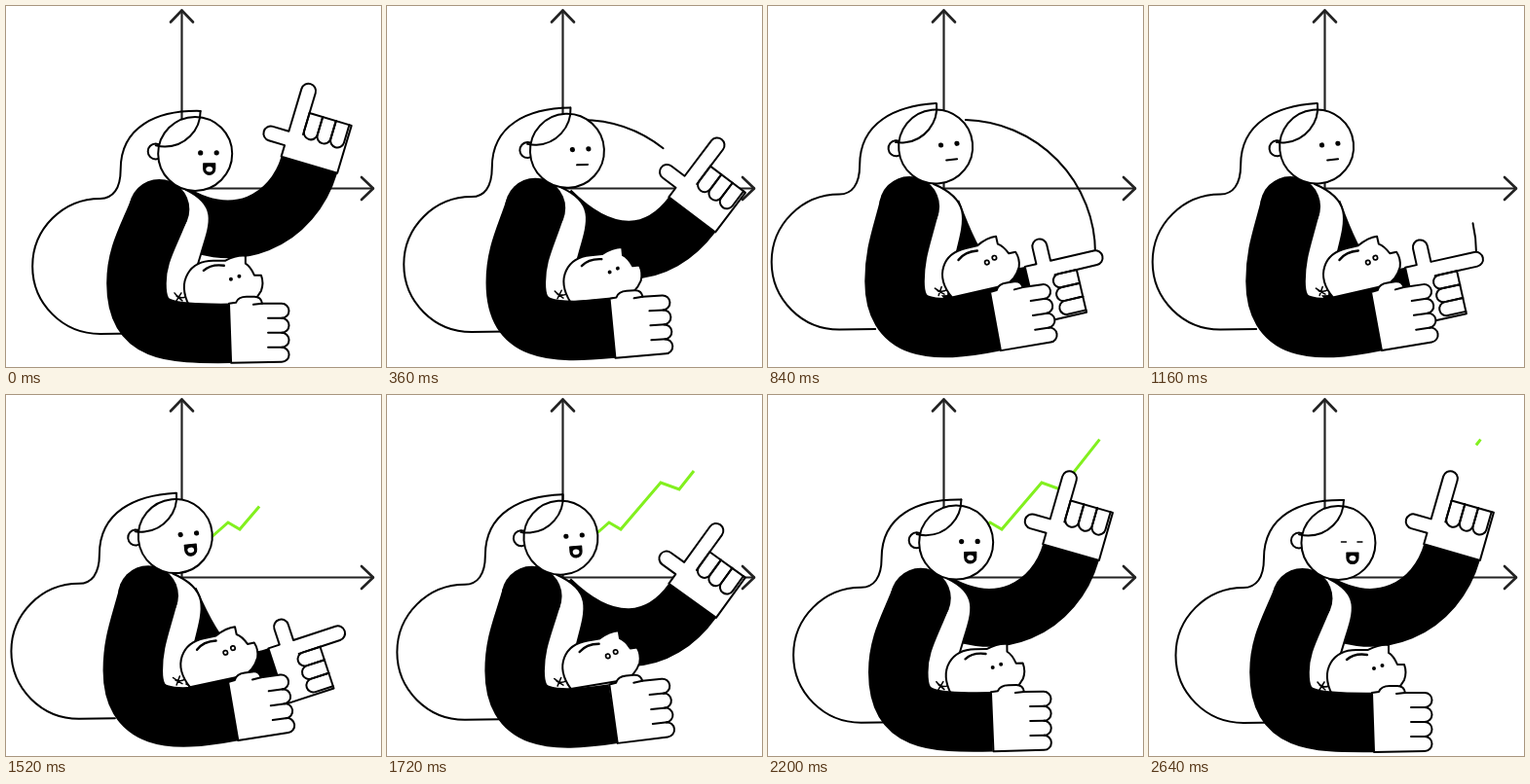
An HTML page with a canvas for the animation above (2.68 s loop, 385x371 px).

```html
<!DOCTYPE html>
<html lang="en">
<head>
<meta charset="utf-8">
<title>Rising chart</title>
<style>
  html, body { margin: 0; width: 100%; height: 100%; overflow: hidden; background: #fff; }
  canvas { display: block; }
</style>
</head>
<body>
<canvas id="stage" width="385" height="371"></canvas>
<script>
const ctx = document.getElementById('stage').getContext('2d');
const LOOP = 2680, INK = '#000', PAPER = '#fff', LIME = '#82f01e', AXIS = '#222';
const RAD = Math.PI / 180, QUARTER = Math.PI / 2;

const clamp = v => Math.min(1, Math.max(0, v));
const mix = (a, b, f) => a.map((v, i) => v + (b[i] - v) * f);
const polar = (x, y, r, degrees) => [x + r * Math.cos(degrees * RAD), y + r * Math.sin(degrees * RAD)];
const sine = (t, from, to) => (1 - Math.cos(Math.PI * clamp((t - from) / (to - from)))) / 2;
const sigmoid = (t, middle, spread) => 1 / (1 + Math.exp((middle - t) / spread));

function paint(fill, stroke, width = 2, path) {
  const target = path ? [path] : [];
  if (fill) { ctx.fillStyle = fill; ctx.fill(...target); }
  if (stroke) { ctx.strokeStyle = stroke; ctx.lineWidth = width; ctx.stroke(...target); }
}

function shape(build, fill, stroke = INK, width) {
  ctx.beginPath();
  build();
  paint(fill, stroke, width);
}

const outline = (d, fill, width, stroke = INK) => paint(fill, stroke, width, new Path2D(d));
const line = (points, color = INK, width = 2) =>
  shape(() => points.forEach(p => ctx.lineTo(...p)), null, color, width);
const dot = (x, y, r) => shape(() => ctx.arc(x, y, r, 0, 7), INK, null);
const ring = (x, y, r, width) => shape(() => ctx.arc(x, y, r, 0, 7), PAPER, INK, width);

function placed([x, y], degrees, draw) {
  ctx.save();
  ctx.translate(x, y);
  ctx.rotate(degrees * RAD);
  draw();
  ctx.restore();
}

// A sleeve is one thick stroke with a flat cuff.
function sleeve(width, start, ...controls) {
  ctx.save();
  ctx.lineCap = 'butt';
  shape(() => {
    ctx.moveTo(...start);
    for (let i = 0; i < controls.length; i += 3) ctx.bezierCurveTo(...controls.slice(i, i + 3).flat());
  }, null, INK, width);
  ctx.restore();
}

function arrow(x, y, degrees, length) {
  placed([x, y], degrees, () => {
    line([[-length, 0], [0, 0]], AXIS, 2.2);
    line([[-12, -11.5], [0, 0], [-12, 11.5]], AXIS, 2.6);
  });
}

function sweep(t) {
  const head = sine(t, 0, 800), tail = sine(t, 800, 1280);
  if (head > tail) shape(() => ctx.arc(199, 254, 137, (tail - 1) * QUARTER, (head - 1) * QUARTER));
}

function chart(t) {
  const length = 220;
  const u = clamp((t - 2000) / 720);
  const head = sine(t, 1120, 1960), tail = u * u * (3 - 2 * u);
  if (head <= tail) return;
  ctx.save();
  ctx.lineCap = 'butt';
  ctx.lineJoin = 'miter';
  ctx.setLineDash([(head - tail) * length, length * 2]);
  ctx.lineDashOffset = -tail * length;
  outline('M185 169L228 131L240 138L281 90L300 97L341 45', null, 3, LIME);
  ctx.restore();
}

function hair(lean) {
  const dx = -24 * lean, dy = -4.5 * lean;
  shape(() => {
    ctx.moveTo(200 - 28 * lean, 108 - 8 * lean);
    ctx.bezierCurveTo(155 + dx, 107 + dy, 118 + dx, 124 + dy, 118 + dx, 168 + dy);
    ctx.bezierCurveTo(118 + dx, 188 + dy, 110 + dx, 198 + dy, 97 + dx, 198 + dy);
    ctx.arc(97 + dx, 267.5 + dy, 69.5, -QUARTER, QUARTER, true);
    ctx.lineTo(134 + dx, 336.5 + dy);
  });
}

// Origin at the middle of the cuff.
function pointingHand() {
  const finger = 14.2, r = 7.5;
  shape(() => {
    ctx.moveTo(30, 0);
    ctx.lineTo(30, -51);
    ctx.lineTo(-15, -51);
    ctx.arc(-22.5, -72.5, r, 0, Math.PI, true);
    ctx.lineTo(-30, -27);
    ctx.arc(-47, -19.5, r, -QUARTER, QUARTER, true);
    ctx.lineTo(-30, -12);
    ctx.lineTo(-30, 0);
    ctx.closePath();
  }, PAPER);
  line([[-15, -51], [-15, -28]]);
  for (let x = -15; x < 25; x += finger) {
    shape(() => {
      ctx.moveTo(x, -51);
      ctx.arc(x + finger / 2, -32, finger / 2, Math.PI, 0, true);
      ctx.lineTo(x + finger, -51);
    });
  }
}

// One angle moves the whole far arm around the shoulder.
function farArm(turn) {
  const shoulder = [168, 210], tilt = 16 + turn;
  const wrist = polar(...shoulder, 151 - .27 * turn, .97 * turn - 18.7);
  sleeve(60, shoulder,
    polar(...shoulder, 80, 32 + .62 * turn),
    polar(...wrist, 58, tilt + 90),
    wrist);
  placed(wrist, tilt, pointingHand);
}

function torso(lean) {
  const edge = () => {
    ctx.moveTo(...mix([185, 189], [170, 183], lean));
    ctx.bezierCurveTo(...mix([232, 212, 196, 240, 190, 300], [222, 205, 192, 235, 185, 297], lean));
  };
  shape(() => {
    edge();
    ctx.lineTo(160, 298);
    ctx.lineTo(158, 182);
  }, PAPER, null);
  shape(edge);
}

function nearArm(lean) {
  const at = (x, y, dx, dy) => [x + dx * lean, y + dy * lean];
  const shoulder = at(157.5, 209, -12.5, -3);
  dot(...shoulder, 31);
  sleeve(61.5, shoulder,
    at(146, 238, -9, 0), at(134, 256, -4, -2), at(134, 285, -4, -2),
    at(134, 335, -4, -3), at(165, 337, 0, 1), at(230, 336.5, 3, -12.5));
}

function face(smile, blink) {
  ring(-40.5, -2.5, 8);
  ring(0, 0, 38);
  shape(() => {
    ctx.moveTo(5.5, -44);
    ctx.arc(-31, -44, 36.5, 0, 105 * RAD);
  });
  for (const x of [5.5, 22]) {
    if (blink) line([[x - 2.5, -1], [x + 2.5, -1]], INK, 1.4);
    else dot(x, -1, 2.6);
  }
  if (!smile) return line([[9.5, 15], [20.5, 15]]);
  outline('M8.5 10H20.5V15.5A6 6 0 0 1 8.5 15.5Z', INK, 1.2);
  shape(() => ctx.ellipse(14.5, 15.8, 3.4, 2.8, 0, 0, 7), PAPER, null);
}

// Origin at the middle of the pig's rear.
function pig(ringEyes) {
  outline('M2 9Q-5 12 -10 5M-3 5L-8 13M-8 8L-2 13', null, 1.5);
  outline('M5 18C-8 -8 6 -28 30 -28L42 -28Q54 -34 63 -33L63 -25Q68 -22 72 -13L79 -13Q82 -5 79 3Q72 16 60 18Z', PAPER);
  outline('M20 -18Q28 -25 41 -23', null, 2.4);
  for (const [x, y] of [[48, -9], [56.5, -12]]) {
    if (ringEyes) ring(x, y, 2.2, 1.7);
    else dot(x, y, 2);
  }
}

// Origin at the upper end of the cuff.
function holdingHand() {
  const finger = 15;
  shape(() => {
    ctx.moveTo(0, 0);
    ctx.lineTo(7, -1);
    ctx.bezierCurveTo(9, -6, 13, -7, 18, -7);
    ctx.lineTo(26, -7);
    ctx.quadraticCurveTo(33, -7, 34, 0);
    for (let i = 0; i < 4; i++) ctx.arc(54, (i + .5) * finger, finger / 2, -QUARTER, QUARTER);
    ctx.lineTo(2, 61);
    ctx.closePath();
  }, PAPER);
  line([[34, 0], [25, 1]]);
  for (let i = 1; i < 4; i++) line([[40, i * finger], [55, i * finger]]);
}

function render(t) {
  const lean = sigmoid(t, 388, 90) - sigmoid(t, 1840, 130);
  const turn = 61.5 * (sigmoid(t, 421, 92) - sigmoid(t, 1672, 66));
  const leaning = (from, to, degrees, draw) => placed(mix(from, to, lean), degrees * lean, draw);

  ctx.fillStyle = PAPER;
  ctx.fillRect(0, 0, 385, 371);
  ctx.lineCap = ctx.lineJoin = 'round';
  arrow(180.5, 4.5, -90, 183);
  arrow(377, 187.5, 0, 196);
  sweep(t);
  chart(t);
  hair(lean);
  farArm(turn);
  torso(lean);
  leaning([183, 290], [180, 283], -13, () => pig(lean > .6));
  nearArm(lean);
  leaning([194.5, 152], [172, 144.5], -6, () => face(t < 120 || t >= 1320, t >= 2560));
  leaning([229, 306], [228, 294], -8.5, holdingHand);
}

function tick() {
  render(performance.now() % LOOP);
  requestAnimationFrame(tick);
}
tick();
</script>
</body>
</html>
```
